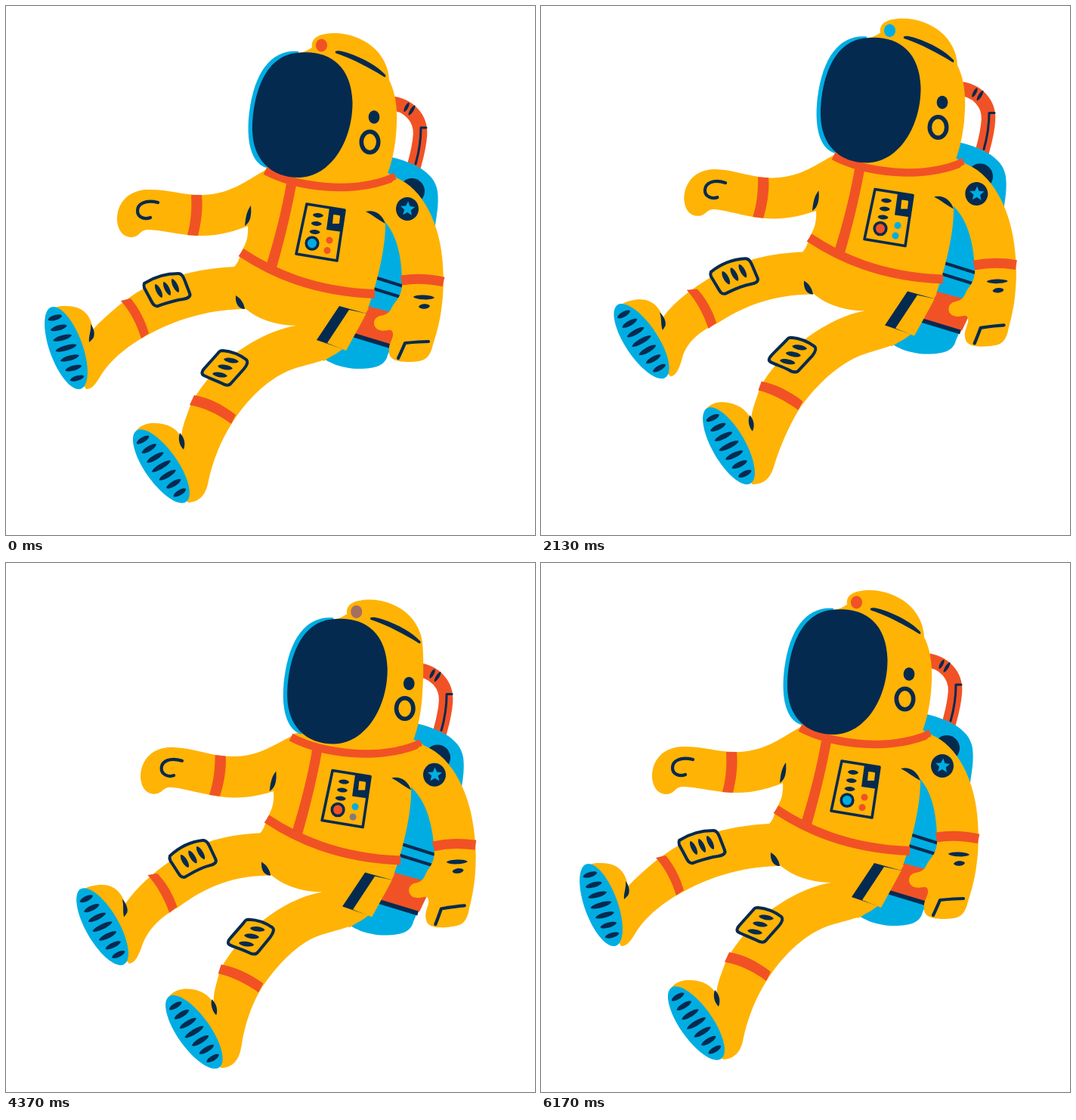
An HTML page with a canvas for the animation above (6210 ms loop, 700x700 px).

```html
<!DOCTYPE html>
<html lang="en">
<head>
<meta charset="utf-8">
<title>Floating astronaut</title>
<style>
html, body { margin: 0; width: 100%; height: 100%; overflow: hidden; background: #fff; }
canvas { display: block; width: 100vmin; height: 100vmin; }
</style>
</head>
<body>
<canvas id="stage" width="700" height="700"></canvas>
<script>
const ctx = document.getElementById('stage').getContext('2d');
const LOOP = 6210, SPAN = 6170;
const YELLOW = '#ffb305', NAVY = '#052a50', CYAN = '#00ade2', RED = '#f15225';
const RED_RGB = [241, 82, 37], CYAN_RGB = [0, 173, 226];
const TIMES = [0, 930, 1400, 2130, 2930, 3730, 5000];
const N = TIMES.length;

// Tracks hold one value per entry in TIMES.
const BODY_X = [0, 14, 25, 44, 58, 48, 20];
const BODY_Y = [0, -16.5, -20, -19.5, -6.3, 8, 13];
const HEAD_X = [0, 0, 0, 0, 9, 11.5, 11];
const RIGHT_ARM = [0, -5, -6, -2.7, 3, 0.8, -7];

// A limb is bent by bones [x, y, angle]; knots are their places along the axis.
const LEFT_ARM = {
  axis: [-1, 0], knots: [-345, -250, -187],
  bones: [
    [[250, 246, 246, 247, 252, 249.5, 244], [277, 267, 264, 273, 285, 280, 261], [0, 4.5, 5.5, 2, -6.5, -2, 6]],
    [[187, 186, 186, 186, 188, 186, 184], [270, 254.5, 251, 262.5, 283.5, 275, 247], [0, 5, 6, 3, -6, -2, 6.5]]
  ]
};
const FAR_LEG = {
  axis: [-0.94, 0.33], knots: [-150, -76, -24.5, 38],
  bones: [
    [[213, 214, 214, 212, 212, 212, 214], [376, 384.5, 386, 376.5, 357.5, 364, 389], [0, -6, -7, -3, 6.5, 3, -13]],
    [[171, 178, 178, 169, 162, 164, 180], [413, 434, 436, 420, 386, 399, 442], [0, -7, -9, -1, 16, 11, -12]],
    [[79.5, 102, 107, 89, 60.5, 66.5, 113.5], [452.5, 486, 490, 463, 405, 425, 500.5], [0, -14, -17, -13.5, 9.7, 6, -21.6]]
  ]
};
const NEAR_LEG = {
  axis: [-0.765, 0.643], knots: [-10, 86, 134, 195],
  bones: [
    [[289, 292, 293, 289, 284, 286, 293], [478, 486.5, 488, 480.5, 464.5, 470, 490], [0, -5, -6, 1, 7.5, 5, -7]],
    [[274, 281, 282, 272, 259, 264, 284], [534, 543.5, 545, 535.5, 514.5, 523, 548], [0, -5, -6, -1, 7.5, 5, -7]],
    [[205.5, 230, 236, 204.5, 170, 181.5, 240], [609, 628, 632, 601.5, 558.5, 577, 631.5], [0, -9, -12, 5, 30, 16.6, -12.7]]
  ]
};

const clamp = v => Math.max(0, Math.min(1, v));
const ramp = (t, a, b) => clamp((t - a) / (b - a));
const keyTime = i => TIMES[(i + N) % N] + Math.floor(i / N) * SPAN;

// Smooth periodic curve through a track.
function at(track, t) {
  let i = N - 1;
  while (TIMES[i] > t) i--;
  const v = k => track[(k + N) % N];
  const slope = k => (v(k + 1) - v(k - 1)) / (keyTime(k + 1) - keyTime(k - 1));
  const h = keyTime(i + 1) - keyTime(i), u = (t - keyTime(i)) / h;
  const u2 = u * u, u3 = u2 * u;
  return v(i) * (2 * u3 - 3 * u2 + 1) + slope(i) * h * (u3 - 2 * u2 + u) +
    v(i + 1) * (3 * u2 - 2 * u3) + slope(i + 1) * h * (u3 - u2);
}

function turn(cx, cy, deg, dx = 0, dy = 0) {
  const c = Math.cos(deg * Math.PI / 180), s = Math.sin(deg * Math.PI / 180);
  return (x, y) => [cx + dx + (x - cx) * c - (y - cy) * s, cy + dy + (x - cx) * s + (y - cy) * c];
}

function bend(limb, t) {
  const maps = [(x, y) => [x, y]];
  for (const [xs, ys, as] of limb.bones)
    maps.push(turn(xs[0], ys[0], at(as, t), at(xs, t) - xs[0], at(ys, t) - ys[0]));
  const { axis, knots } = limb, last = knots.length - 1;
  return (x, y) => {
    const s = x * axis[0] + y * axis[1];
    if (s <= knots[0]) return [x, y];
    if (s >= knots[last]) return maps[last](x, y);
    let i = 0;
    while (s > knots[i + 1]) i++;
    const w = ramp(s, knots[i], knots[i + 1]);
    const a = maps[i](x, y), b = maps[i + 1](x, y);
    return [a[0] + (b[0] - a[0]) * w, a[1] + (b[1] - a[1]) * w];
  };
}

let warp = null;
function shape(d) {
  if (!warp) return new Path2D(d);
  return new Path2D(d.replace(/(-?[\d.]+) (-?[\d.]+)/g, (_, x, y) =>
    warp(+x, +y).map(n => n.toFixed(2)).join(' ')));
}
function fill(d, color) {
  ctx.fillStyle = color;
  ctx.fill(shape(d));
}
function line(d, color, width, cap = 'round') {
  ctx.strokeStyle = color;
  ctx.lineWidth = width;
  ctx.lineCap = cap;
  ctx.lineJoin = 'round';
  ctx.stroke(shape(d));
}

// Builds path text from points given in a turned local frame.
function local(x, y, deg, cmds) {
  const map = turn(x, y, deg);
  return cmds.map(([c, ...p]) => {
    let out = c;
    for (let i = 0; i < p.length; i += 2)
      out += ' ' + map(x + p[i], y + p[i + 1]).map(n => n.toFixed(2)).join(' ');
    return out;
  }).join(' ') + ' Z';
}
function oval(x, y, rx, ry, deg = 0) {
  const k = 0.5523, a = rx * k, b = ry * k;
  return local(x, y, deg, [['M', rx, 0], ['C', rx, b, a, ry, 0, ry], ['C', -a, ry, -rx, b, -rx, 0],
    ['C', -rx, -b, -a, -ry, 0, -ry], ['C', a, -ry, rx, -b, rx, 0]]);
}
function lens(x, y, rx, ry, deg = 0) {
  const a = rx * 0.75, b = ry * 1.33;
  return local(x, y, deg, [['M', -rx, 0], ['C', -a, -b, a, -b, rx, 0], ['C', a, b, -a, b, -rx, 0]]);
}

function sole(x, y, tilt) {
  fill(oval(x, y, 21.8, 57.5, tilt), CYAN);
  const put = turn(x, y, tilt);
  for (let i = -3; i <= 3; i++) {
    const [tx, ty] = put(x, y + i * 14.2);
    fill(lens(tx, ty, 14.5 - Math.abs(i) * 1.6, 3.4, tilt + 4), NAVY);
  }
}

function patch(d, slots, deg) {
  fill(d, YELLOW);
  line(d, NAVY, 4);
  for (const [x, y] of slots) fill(lens(x, y, 10, 3.2, deg), NAVY);
}

function pack() {
  line('M506 128 C535 130 549 150 548 170 C547 188 543 200 539 215', RED, 18.5, 'butt');
  fill(lens(530, 134, 7, 2.2, -62), NAVY);
  fill(lens(537, 138, 8, 2.2, -58), NAVY);
  line('M556 161 L549 161 C549 180 546 195 542 209', NAVY, 3);
  fill('M506 199 C532 205 567 217 571 245 C573 262 570 276 568 290 C562 330 548 366 535 392 L505 462 C502 475 490 480 467 480 C445 480 426 472 416 463 L460 400 L490 250 Z', CYAN);
  fill(oval(537, 245, 17, 17), NAVY);
  line('M488 359 L545 377 M483 373 L538 390', NAVY, 4, 'butt');
  fill('M475 396 L531 411 L513 449 L460 433 Z', RED);
  line('M455 434 L511 451', NAVY, 6, 'butt');
}

function farLeg() {
  fill('M340 345 L302 345 C262 347 222 355 182 374 C160 386 136 406 115 428 C113 412 104 397 80 397 C62 396 53 404 52 420 L106 507 C114 507 119 500 126 488 C142 463 170 444 190 434 C220 418 260 402 316 401 L345 390 Z', YELLOW);
  fill('M152 390 L165 387 C176 400 184 416 189 433 L179 440 C173 421 165 405 152 390 Z', RED);
  sole(79.5, 452.5, -20);
  fill('M112 421 C117 427 118 436 115 440 L110 445 C109 437 113 430 112 421 Z', NAVY);
  patch('M183 367 C197 358 214 354 228 354 C233 354 235 359 238 367 L243 380 C245 385 240 387 234 388 C220 390 210 394 201 397 C196 398 194 394 190 386 L183 373 C182 370 182 369 183 367 Z',
    [[202, 377], [213, 374], [224, 370]], 64);
}

function nearLeg() {
  fill('M384 423 C352 428 318 447 290 470 C268 490 254 510 245 526 C238 545 233 556 232 571 C226 558 212 551 192 552 C176 554 168 563 168 576 L241 657 C258 656 265 645 268 628 C274 600 285 574 299 552 C318 522 345 495 373 483 C400 472 425 473 450 450 L480 400 L400 400 Z', YELLOW);
  fill('M249 515 C268 518 288 528 304 541 L298 553 C282 541 262 531 243 528 Z', RED);
  sole(205.5, 609, -35);
  fill('M230 565 C236 571 238 579 235 587 C230 582 227 574 230 565 Z', NAVY);
  patch('M287 456 C299 457 310 462 318 468 C321 471 319 475 315 480 L298 499 C295 503 290 502 285 499 C277 495 268 492 262 489 C258 487 259 483 263 479 L280 460 C283 456 284 456 287 456 Z',
    [[298, 469], [290, 478], [283, 488]], 10);
}

function torso() {
  fill('M345 214 L320 290 C321 305 318 314 312 324 C309 334 306 342 301 346 L290 370 L306 388 C318 407 348 423 386 423 L420 470 C438 462 470 420 479 400 C490 370 503 320 502 285 L535 240 L515 226 C470 200 390 200 345 214 Z', YELLOW);
}

function leftArm() {
  fill('M345 216 C315 233 298 248 262 250 C235 251 215 242 185 243 C160 245 146 262 147 285 C149 300 157 306 166 306 C178 305 176 297 187 296 C202 296 217 300 240 303 C275 307 300 299 323 290 L365 280 L365 225 Z', YELLOW);
  fill('M245 250 L259 250 C261 268 258 288 254 304 L240 303 C245 285 246 268 245 250 Z', RED);
  fill('M324 264 C325 275 324 286 316 291 C317 281 318 272 324 264 Z', NAVY);
  line('M201 260 C184 256 174 262 174 271 C174 280 184 283 191 280', NAVY, 4.2);
}

function mix(w) {
  return 'rgb(' + RED_RGB.map((r, i) => Math.round(r + (CYAN_RGB[i] - r) * w)) + ')';
}
// 1 while a light shows its second colour; it does so twice a loop.
function blink(t, on, off) {
  const p = t % (LOOP / 2) / (LOOP / 2);
  return ramp(p, on - 0.035, on + 0.035) - ramp(p, off - 0.035, off + 0.035);
}

function suit(t) {
  fill('M371 235 L384 237 C377 275 367 315 357 350 L344 344 C356 305 365 270 371 235 Z', RED);
  line('M311 326 C350 352 405 378 488 381', RED, 12, 'butt');
  line('M398 262 L448 270 L438 337 L384 328 Z', NAVY, 3.6);
  for (let i = 0; i < 3; i++) fill(lens(413 - i * 2.2, 277 + i * 11, 7, 2.9, 5), NAVY);
  fill('M428 267 L449 270 L445 299 L424 296 Z', NAVY);
  fill('M434 276 L441 277 C442 277 442 278 442 279 L441 288 L432 288 L433 278 C433 277 433 276 434 276 Z', YELLOW);
  fill(oval(405, 314, 7, 7), mix(1 - blink(t, 0.3, 0.85)));
  line(oval(405, 314, 7.8, 8), NAVY, 3.6);
  fill(oval(428, 310, 4.5, 4.6), mix(blink(t, 0.37, 0.89)));
  fill(oval(425, 323.5, 4.5, 4.6), mix(blink(t, 0.41, 0.944)));
  fill('M304 383 C311 387 315 394 316 401 C308 401 303 394 304 383 Z', NAVY);
  fill('M441 397 L477 407 L449 455 L411 442 Z', NAVY);
  fill('M454 402 L477 407 L450 456 L425 446 Z', YELLOW);
}

function rightArm() {
  fill('M515 227 C552 240 575 290 578 342 C580 370 578 388 576 402 C574 418 569 436 565 448 C562 462 556 469 546 470 C530 472 508 472 507 459 C505 447 513 441 512 433 C510 424 502 433 492 428 C484 423 486 412 495 410 C510 408 508 400 515 392 C523 383 525 372 524 360 C523 330 517 303 501 285 L490 265 Z', YELLOW);
  line('M523 363 C541 360 561 361 579 365', RED, 13, 'butt');
  fill(oval(531, 268.5, 15, 15.5), NAVY);
  let star = '';
  for (let i = 0; i < 10; i++) {
    const r = i % 2 ? 4.6 : 10, a = i * Math.PI / 5 - 1.5;
    star += `${i ? 'L' : 'M'}${(531.5 + r * Math.cos(a)).toFixed(2)} ${(268.5 + r * Math.sin(a)).toFixed(2)} `;
  }
  fill(star + 'Z', CYAN);
  fill(lens(553, 385.5, 14, 2.9, 2), NAVY);
  fill(lens(553.5, 397.5, 7.5, 3.2, -4), NAVY);
  line('M559 444 C548 444 538 445 528 446 C525 453 522 460 519 466', NAVY, 4.2);
}

function head(t) {
  const hx = at(HEAD_X, t);
  // The back of the shell stays with the body while the face turns.
  warp = (x, y) => [x + hx * (x < 500 ? 1 : y < 101 ? 0.85 : 0), y];
  fill('M386 62 C396 61 400 58 405 55 C403 42 415 36 435 36 C472 36 506 62 507 98 C519 122 518 150 516 172 C513 198 509 212 503 227 C470 236 390 236 345 214 Z', YELLOW);
  warp = null;
  line('M343 218 C385 240 460 250 515 226', RED, 10.5, 'butt');
  ctx.save();
  ctx.translate(hx, 0);
  fill('M387 60 C353 57 329 85 322 140 C317 180 325 208 344 214 L388 190 Z', CYAN);
  fill('M385 62 C424 57 457 76 458.5 127 C459 178 430 226 388 227 C350 227 327 203 326 165 C326 120 341 66 385 62 Z', NAVY);
  const a = ramp(t, 2900, 3300), b = ramp(t, 2550, 2880);
  if (b > a && a < 1) {
    const glint = (x, y, w, h, lw) =>
      line(`M${x + w * a} ${y - h * a} L${x + w * b} ${y - h * b}`, CYAN, lw);
    glint(339, 186, 97, 65, 4);
    glint(349, 200, 98, 66, 5);
  }
  fill('M436 60 C439 58 446 60 452 62 C473 69 492 80 502 91 C503 94 502 95 499 93 C480 81 460 71 441 64 C437 63 435 62 436 60 Z', NAVY);
  fill(oval(487, 147, 7.3, 8.8), NAVY);
  line(oval(481.5, 180, 11.2, 13.7), NAVY, 5.6);
  fill(oval(417.5, 52, 7.5, 8.5), mix(blink(t, 0.42, 0.92)));
  ctx.restore();
}

function limb(part, map) {
  warp = map;
  part();
  warp = null;
}

function draw(now) {
  const t = now % LOOP, m = t < SPAN ? t : 0;
  ctx.fillStyle = '#fff';
  ctx.fillRect(0, 0, 700, 700);
  ctx.save();
  ctx.translate(at(BODY_X, m), at(BODY_Y, m));
  pack();
  limb(farLeg, bend(FAR_LEG, m));
  limb(nearLeg, bend(NEAR_LEG, m));
  torso();
  limb(leftArm, bend(LEFT_ARM, m));
  suit(t);
  head(m);
  limb(rightArm, turn(520, 240, at(RIGHT_ARM, m)));
  line('M508 228 L515 225', RED, 9, 'butt');
  fill('M476 272 C488 269 498 276 502 288 C494 284 486 277 476 272 Z', NAVY);
  ctx.restore();
}

let start = null;
function frame(now) {
  if (start === null) start = now;
  draw(now - start);
  requestAnimationFrame(frame);
}
draw(0);
requestAnimationFrame(frame);
</script>
</body>
</html>
```
